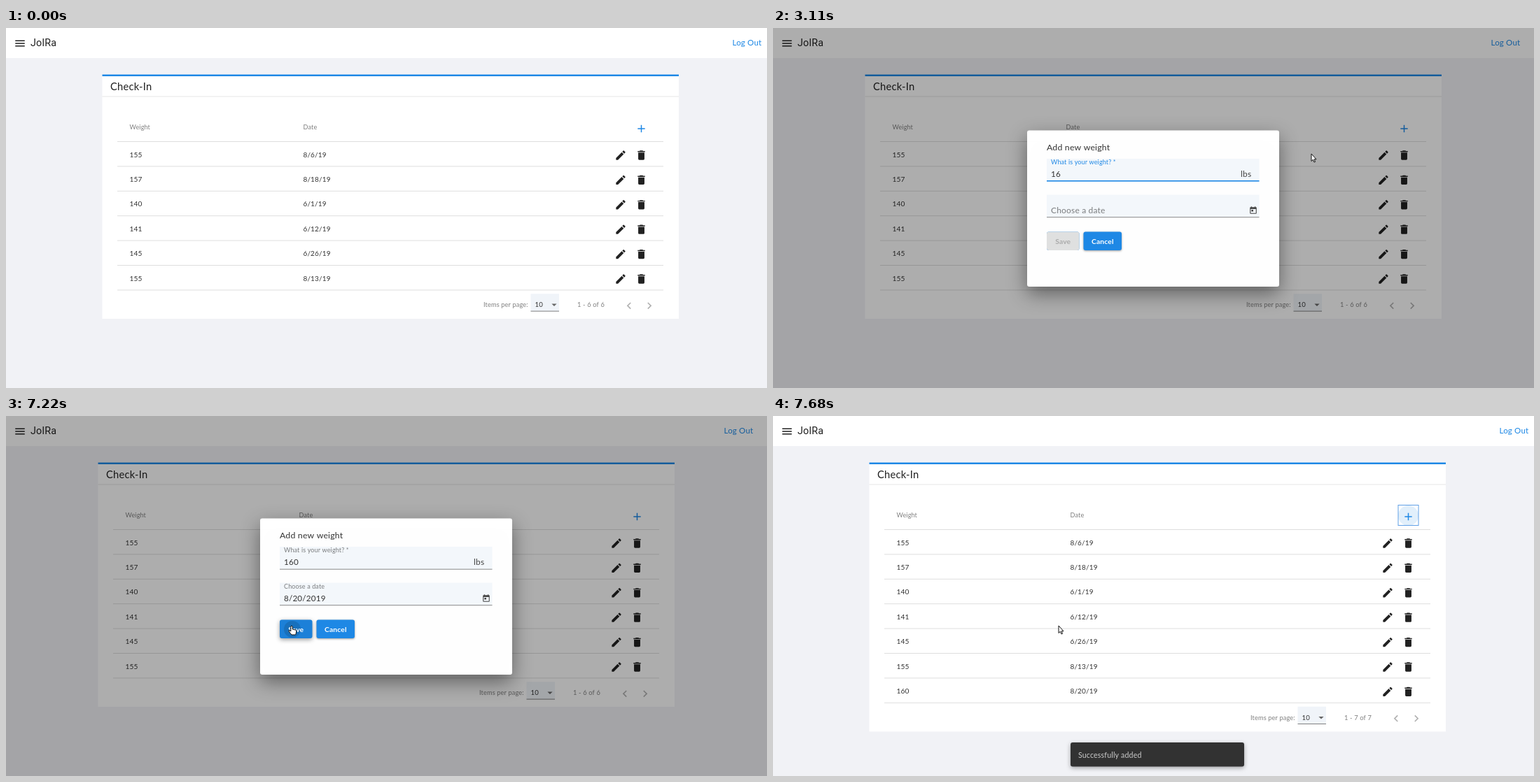
These frames come from a looping animation (1087x515 px, 8000 ms). An HTML page with a canvas:

```html
<!DOCTYPE html>
<html lang="en">
<head>
<meta charset="utf-8">
<title>Check-In</title>
<style>
html, body { margin: 0; width: 100%; height: 100%; overflow: hidden; background: #f1f2f6; }
canvas { display: block; }
</style>
</head>
<body>
<canvas id="stage" width="1087" height="515"></canvas>
<script>
const ctx = document.getElementById('stage').getContext('2d');
const W = 1087, H = 515, LOOP = 8000;
const BLUE = '#1e88e5', INK = '#212121', GREY = 'rgba(0,0,0,.5)';
const SANS = 'Lato, "Open Sans", sans-serif';

const icon = {
  menu: 'M3 18h18v-2H3zM3 13h18v-2H3zM3 6v2h18V6z',
  plus: 'M19 13h-6v6h-2v-6H5v-2h6V5h2v6h6z',
  edit: 'M3 17.25V21h3.75L17.81 9.94l-3.75-3.75zM20.71 7.04a1 1 0 0 0 0-1.41l-2.34-2.34a1 1 0 0 0-1.41 0l-1.83 1.83 3.75 3.75z',
  trash: 'M6 19a2 2 0 0 0 2 2h8a2 2 0 0 0 2-2V7H6zM19 4h-3.5l-1-1h-5l-1 1H5v2h14z',
  left: 'M15.41 7.41L14 6l-6 6 6 6 1.41-1.41L10.83 12z',
  right: 'M10 6L8.59 7.41 13.17 12l-4.58 4.59L10 18l6-6z',
  today: 'M19 3h-1V1h-2v2H8V1H6v2H5a2 2 0 0 0-2 2v14a2 2 0 0 0 2 2h14a2 2 0 0 0 2-2V5a2 2 0 0 0-2-2zm0 16H5V8h14zM7 10h5v5H7z',
  arrow: 'M0 0V10.5L2.4 8.3 4 12 5.6 11.3 4 7.8H7z',
  hand: 'M-1.2 1Q0-1 1.2 1V5L5.5 6Q7 6.3 6.8 8L6 12Q5.8 13 5 13H0Q-1 12-4 8Q-4.5 6.5-3 6.6L-1.2 8z'
};
for (const k in icon) icon[k] = new Path2D(icon[k]);

const rows = [[155, '8/6/19'], [157, '8/18/19'], [140, '6/1/19'], [141, '6/12/19'],
  [145, '6/26/19'], [155, '8/13/19'], [160, '8/20/19']];

const bursts = [[440, 1220, 11], [1290, 2090, 11], [2180, 2570, 6], [3020, 3170, 3], [3630, 4400, 11],
  [4480, 4570, 2], [4720, 5500, 11], [5570, 6360, 11], [6450, 7220, 11], [7300, 7680, 6]];

// Pointer stops: time, x, y
const stops = [[440, 967, 373], [1220, 908, 158], [1370, 906, 142], [2090, 906, 142], [2570, 769, 180],
  [3630, 769, 180], [4400, 692, 260], [4720, 692, 260], [5500, 515, 212], [6040, 474, 185],
  [6400, 474, 185], [7140, 408, 300]];

const clamp = v => Math.max(0, Math.min(1, v));
const span = (t, start, len) => clamp((t - start) / len);
const mix = (a, b, p) => a + (b - a) * p;
const smooth = p => p * p * (3 - 2 * p);

function bezier(x1, y1, x2, y2) {
  const at = (a, b, u) => 3 * u * (1 - u) * ((1 - u) * a + u * b) + u * u * u;
  return x => {
    let lo = 0, hi = 1;
    for (let i = 0; i < 20; i++) {
      const mid = (lo + hi) / 2;
      if (at(x1, x2, mid) < x) lo = mid; else hi = mid;
    }
    return at(y1, y2, lo);
  };
}
const swift = bezier(.25, .8, .25, 1);
const decel = bezier(0, 0, .2, 1);

function capture(t) {
  let seen = 0;
  for (const [start, end, n] of bursts) {
    if (t < start) break;
    const step = (end - start) / (n - 1);
    seen = Math.min(end, start + step * Math.floor((t - start) / step + .1));
  }
  return seen;
}

function pointer(t) {
  let i = 0;
  while (i < stops.length - 2 && t >= stops[i + 1][0]) i++;
  const [t0, x0, y0] = stops[i], [t1, x1, y1] = stops[i + 1];
  const p = smooth(span(t, t0, t1 - t0));
  return [mix(x0, x1, p), mix(y0, y1, p)];
}

function text(str, x, cy, size, color = INK, align = 'left', weight = 400, family = SANS) {
  ctx.font = `${weight} ${size}px ${family}`;
  ctx.letterSpacing = size * .015 + 'px';
  ctx.textAlign = align;
  ctx.fillStyle = color;
  ctx.fillText(str, x, cy + size * .36);
}

function rect(x, y, w, h, color) {
  ctx.fillStyle = color;
  ctx.fillRect(x, y, w, h);
}

function panel(x, y, w, h, r, color, blur = 0, drop = 0, shade = .35) {
  ctx.save();
  if (blur) {
    ctx.shadowColor = `rgba(0,0,0,${shade})`;
    ctx.shadowBlur = blur;
    ctx.shadowOffsetY = drop;
  }
  ctx.beginPath();
  ctx.roundRect(x, y, w, h, r);
  ctx.fillStyle = color;
  ctx.fill();
  ctx.restore();
}

function disc(x, y, r, color) {
  ctx.beginPath();
  ctx.arc(x, y, r, 0, 7);
  ctx.fillStyle = color;
  ctx.fill();
}

function outline(x, y, w, h) {
  ctx.strokeStyle = '#5f9fe6';
  ctx.lineWidth = 1;
  ctx.strokeRect(x, y, w, h);
}

function glyph(name, cx, cy, scale, color) {
  ctx.save();
  ctx.translate(cx, cy);
  ctx.scale(scale, scale);
  ctx.translate(-12, -12);
  ctx.fillStyle = color;
  ctx.fill(icon[name], 'evenodd');
  ctx.restore();
}

function caretDown(x, y, w, color) {
  ctx.beginPath();
  ctx.moveTo(x - w, y - w / 2);
  ctx.lineTo(x + w, y - w / 2);
  ctx.lineTo(x, y + w / 2);
  ctx.fillStyle = color;
  ctx.fill();
}

// Draw something scaled about a centre with an opacity
function popped(cx, cy, sx, sy, alpha, draw) {
  if (alpha <= 0) return;
  ctx.save();
  ctx.globalAlpha = alpha;
  ctx.translate(cx, cy);
  ctx.scale(sx, sy);
  ctx.translate(-cx, -cy);
  draw();
  ctx.restore();
}

function drawPage(t) {
  const shifted = t >= 1830 && t < 7440;
  const count = t >= 7520 ? 7 : 6;
  const pitch = 35.4, extra = (count - 6) * pitch;
  rect(0, 0, W, H, '#f1f2f6');
  rect(0, 0, W, 43, '#fff');
  glyph('menu', 20, 22, .75, INK);
  text('JolRa', 35, 20.5, 14.3, INK, 'left', 400, 'Roboto, sans-serif');
  text('Log Out', shifted ? 1025.5 : 1037.5, 21, 11.5, BLUE);

  ctx.save();
  if (shifted) ctx.translate(-6, 0);
  rect(137.5, 66.5, 823.5, 349.5 + extra, '#fff');
  rect(137.5, 66.5, 823.5, 2.5, BLUE);
  text('Check-In', 149, 83.5, 14.7);
  rect(137.5, 97.5, 823.5, 1, '#e6e6e6');
  text('Weight', 176.5, 142, 9, GREY);
  text('Date', 424.5, 142, 9.1, GREY);

  const focus = t >= 7440;
  if (focus || (t >= 1290 && t < 2150)) disc(907.5, 142.5, 14.5, '#e1effb');
  if (focus) outline(893, 127.5, 29, 29);
  glyph('plus', 907.5, 144, .74, BLUE);

  for (let i = 0; i <= count; i++) {
    rect(159, 162 + pitch * i, 780, 1, '#dedede');
    if (i === count) break;
    const y = 181 + pitch * i;
    text(rows[i][0], 176.5, y, 10.2, '#333');
    text(rows[i][1], 424.5, y, 10, '#333');
    glyph('edit', 878, y + 1, .74, INK);
    glyph('trash', 907.5, y + 1, .74, INK);
  }

  const y = 395.8 + extra;
  text('Items per page:', 682, y, 9.2, GREY);
  rect(749.5, y - 15.5, 40.5, 25, '#f0f4f9');
  rect(749.5, y + 8.8, 40.5, 1, '#808080');
  text('10', 755.5, y, 9.6, '#333');
  caretDown(783, y + .5, 3.6, '#666');
  text(`1 - ${count} of ${count}`, 816, y, 9.3, GREY);
  glyph('left', 890, y + 1.5, .82, '#b0b0b0');
  glyph('right', 919, y + 1.5, .82, '#b0b0b0');
  ctx.restore();
}

function drawField(y, label, value, lift, focused) {
  rect(391, y, 303.5, 32.5, '#f3f7fb');
  rect(391, y + (focused ? 31 : 31.7), 303.5, focused ? 1.6 : 1, focused ? BLUE : '#8a8a8a');
  text(label, 397, mix(y + 22, y + 5.2, lift), mix(12, 9, lift), focused ? BLUE : GREY);
  if (value) text(value, 397, y + 22, 11.7, '#333');
}

function drawDialog(t) {
  panel(363, 146.5, 360, 223.5, 3, '#fff', 28, 10, .45);
  text('Add new weight', 391, 171, 12.3, '#333');

  const focused = t >= 2000 && t < 4480;
  const typed = '160'.slice(0, t < 3020 ? 0 : t < 3090 ? 1 : t < 3170 ? 2 : 3);
  drawField(187, 'What is your weight? *', typed, swift(span(t, 2000, 400)), focused);
  text('lbs', 668, 209, 12, '#444');
  if (focused && t >= 3630 && (t - 3630) % 1060 < 530) rect(418, 203, 1, 12, BLUE);

  const picked = t >= 6210;
  drawField(238.5, 'Choose a date', picked ? '8/20/2019' : '', swift(span(t, 6210, 400)), false);
  glyph('today', 686, 261, .53, t >= 4720 && !picked ? BLUE : '#444');
  if ((t >= 4480 && t < 4720) || (t >= 6270 && t < 7140)) outline(677.5, 252.5, 17, 17);

  // Save fades to its disabled look while the dialog opens
  const off = picked ? 0 : span(t, 1830, 170);
  const hover = t >= 7060;
  panel(391, 291.5, 46.5, 26.5, 3, BLUE, hover ? 6 : 3, hover ? 2 : 1, off ? 0 : .4);
  if (off) panel(391, 291.5, 46.5, 26.5, 3, `rgba(224,224,224,${off})`);
  if (t >= 7140) {
    ctx.save();
    ctx.beginPath();
    ctx.roundRect(391, 291.5, 46.5, 26.5, 3);
    ctx.clip();
    rect(391, 291, 47, 28, 'rgba(0,0,0,.06)');
    disc(409, 305, 32 * decel(span(t, 7190, 225)), 'rgba(0,0,0,.13)');
    ctx.restore();
  }
  text('Save', 414.2, 304.8, 10.3, off ? '#ababab' : '#fff', 'center', 700);
  panel(443.5, 291.5, 54.5, 26.5, 3, BLUE, 3, 1, .4);
  text('Cancel', 470.8, 304.8, 10.3, '#fff', 'center', 700);
}

const cellX = c => 411.5 + 28.9 * c;
const cellY = r => 96.5 + 28.8 * r;

function hoveredDay(x, y) {
  const c = Math.round((x - 411.5) / 28.9), r = Math.round((y - 96.5) / 28.8);
  const inside = c >= 0 && c < 7 && r >= 0 && r < 5;
  return inside ? r * 7 + c - 3 : 0;
}

function drawCalendar(day) {
  panel(391, 3.5, 214, 255.5, 3, '#fff', 9, 2, .45);
  panel(395, 19, 83, 29, 3, BLUE, 2, 1, .3);
  text('AUG 2019', 407, 33.8, 10.2, '#fff', 'left', 700);
  caretDown(463, 34, 3.4, 'rgba(0,0,0,.5)');
  glyph('left', 558, 33.5, .74, '#444');
  glyph('right', 587, 33.5, .74, '#444');
  [...'SMTWTFS'].forEach((d, c) => text(d, cellX(c), 64, 8, '#9a9a9a', 'center'));
  rect(391, 76, 214, 1, '#e2e2e2');
  text('AUG', 407, cellY(0), 9.8, '#757575');
  for (let d = 1; d <= 31; d++) {
    const x = cellX((d + 3) % 7), y = cellY(Math.floor((d + 3) / 7));
    if (d === day || d === 21) disc(x, y - .3, 13, '#f2f2f2');
    if (d === 21) {
      ctx.strokeStyle = '#999';
      ctx.lineWidth = 1;
      ctx.stroke();
    }
    text(d, x, y, 9.6, '#333', 'center');
  }
}

function drawSnack() {
  panel(425, 467, 248, 34.5, 3, '#323232', 6, 2, .35);
  text('Successfully added', 436, 485, 10.6, 'rgba(255,255,255,.75)');
}

function drawPointer(x, y, hand) {
  ctx.save();
  ctx.translate(x, y);
  ctx.lineWidth = 1;
  ctx.lineJoin = 'round';
  ctx.fillStyle = '#fff';
  ctx.strokeStyle = '#111';
  const shape = hand ? icon.hand : icon.arrow;
  ctx.fill(shape);
  ctx.stroke(shape);
  ctx.restore();
}

function draw(t) {
  ctx.clearRect(0, 0, W, H);
  drawPage(t);

  const dim = .32 * swift(span(t, 1830, 400)) * (1 - swift(span(t, 7275, 400)));
  rect(0, 0, W, H, `rgba(0,0,0,${dim})`);

  const open = decel(span(t, 1830, 150));
  const shown = span(t, 1830, 100) * (1 - span(t, 7275, 75));
  popped(543, 258.3, mix(.7, 1, open), mix(.7, 1, open), shown * .995, () => drawDialog(t));

  const [x, y] = pointer(t);
  const calendar = span(t, 4690, 100) * (1 - span(t, 6210, 100));
  const day = calendar ? hoveredDay(x, y) : 0;
  popped(498, 259, 1, mix(.8, 1, decel(span(t, 4690, 120))), calendar, () => drawCalendar(day));

  const snack = span(t, 7500, 150);
  popped(549, 484, mix(.8, 1, decel(snack)), mix(.8, 1, decel(snack)), snack, drawSnack);

  if (t >= 4480 && t < 4570) disc(693, 261, 8, 'rgba(255,236,30,.75)');
  if (t < 440) return;
  const hand = (t >= 1290 && t < 1830) || (t >= 4320 && t < 4800) || day > 0 || (t >= 7060 && t < 7290);
  drawPointer(x, y, hand);
}

function frame(now) {
  draw(capture(now % LOOP));
  requestAnimationFrame(frame);
}
requestAnimationFrame(frame);
</script>
</body>
</html>
```
